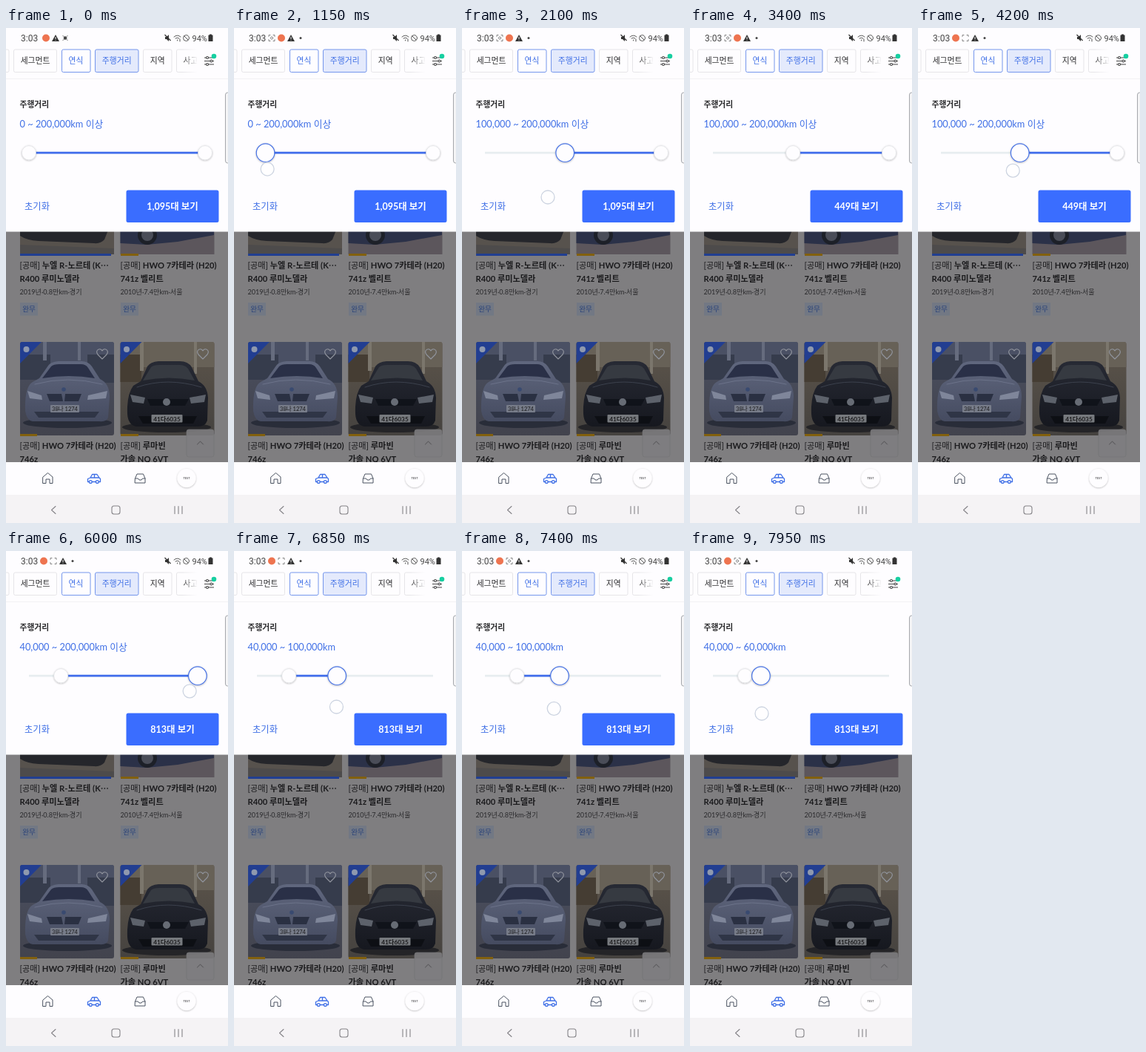
Write an HTML page that moves like this. It is 300 by 667 pixels and loops after 8000 ms.

```html
<!DOCTYPE html>
<html lang="ko">
<head>
<meta charset="utf-8">
<style>
html, body { margin: 0; width: 100%; height: 100%; overflow: hidden; background: #fff; }
svg { display: block; width: 300px; height: 667px; }
text { font-family: Lato, 'Noto Sans CJK KR', 'Noto Sans CJK', sans-serif; font-size: 10.8px; fill: #2b2b2d; white-space: pre; }
.status { font-family: Roboto, sans-serif; fill: #444; }
.bold { font-weight: 700; }
.blue { fill: #3f6fe6; }
.mid { text-anchor: middle; }
.line { fill: none; stroke-linecap: round; stroke-linejoin: round; }
.page text { fill: #1b1b1d; font-size: 11.2px; }
.page .info { font-size: 9.1px; fill: #2a2a2c; }
.page .tag { font-size: 9.6px; fill: #2a4379; }
</style>
</head>
<body>
<svg viewBox="0 0 300 667">
  <defs>
    <filter id="shadow" x="-30%" y="-30%" width="160%" height="170%">
      <feDropShadow dx="0" dy=".7" stdDeviation="1" flood-color="#222" flood-opacity=".3"/>
    </filter>
    <linearGradient id="fade"><stop stop-color="#fefdff" stop-opacity="0"/><stop offset="1" stop-color="#fefdff"/></linearGradient>
    <linearGradient id="coolRoad" x2="0" y2="1"><stop stop-color="#4b5061"/><stop offset="1" stop-color="#42434d"/></linearGradient>
    <linearGradient id="warmRoad" x2="0" y2="1"><stop stop-color="#5d554b"/><stop offset="1" stop-color="#45423f"/></linearGradient>
    <linearGradient id="paleBody" x2="0" y2="1"><stop stop-color="#60677e"/><stop offset="1" stop-color="#454b60"/></linearGradient>
    <linearGradient id="darkBody" x2="0" y2="1"><stop stop-color="#272a34"/><stop offset="1" stop-color="#16181f"/></linearGradient>
    <clipPath id="leftPhoto"><rect x="19" y="423" width="127" height="126" rx="3"/></clipPath>
    <clipPath id="rightPhoto"><rect x="154.500" y="423" width="127" height="126" rx="3"/></clipPath>
  </defs>

  <g class="page">
    <rect y="270" width="300" height="320" fill="#7f7e80"/>
    <!-- upper photos -->
    <rect x="19" y="270" width="127" height="35" fill="#57524d"/>
    <path d="M19 270H139L133 285Q128 291 119 290L44 287Q28 286 19 280Z" fill="#25262b"/>
    <path d="M19 292L146 297V305H19Z" fill="#4d4b4b"/>
    <rect x="154.500" y="270" width="127" height="35" fill="#5c565c"/>
    <path d="M154.500 270H281V279L232 288 190 292 154.500 290Z" fill="#2b3148"/>
    <circle cx="191" cy="279" r="13" fill="#1d2028"/><circle cx="191" cy="279" r="8" fill="#4a4d58"/>
    <path d="M19 304H142V307H19Z" fill="#213f91"/>
    <path d="M155 304H179V307H155Z" fill="#82600e"/>
    <text x="18.500" y="324">[공매] <tspan class="bold">누엘 R-노르테 (K⋯</tspan></text>
    <text x="18.500" y="342" class="bold">R400 루미노델라</text>
    <text x="18.500" y="358.500" class="info">2019년·0.8만km·경기</text>
    <text x="154.500" y="324">[공매] <tspan class="bold">HWO 7카테라 (H20)</tspan></text>
    <text x="154.500" y="342" class="bold">741z 벨리트</text>
    <text x="154.500" y="358.500" class="info">2010년·7.4만km·서울</text>
    <path d="M19 370H43V387.500H19ZM155 370H179V387.500H155Z" fill="#727884"/>
    <text x="31" y="382" class="tag mid">완무</text>
    <text x="167" y="382" class="tag mid">완무</text>

    <!-- pale car -->
    <g clip-path="url(#leftPhoto)">
      <rect x="19" y="423" width="127" height="126" fill="url(#coolRoad)"/>
      <path d="M19 423H146V462H19Z" fill="#4a5064"/>
      <path d="M19 440H60V474H19ZM110 440H146V478H110Z" fill="#363c4c"/>
      <path d="M50 423H55V448H50ZM97 423H101V448H97Z" fill="#666c7e"/>
      <ellipse cx="83" cy="532" rx="60" ry="7" fill="#292d39"/>
      <path d="M26 516Q25 483 36 477L45 472 57 455Q60 450 71 449H102Q111 449 116 456L127 473Q140 479 140 497L138 525Q136 531 126 530H36Q28 529 26 516Z" fill="url(#paleBody)"/>
      <path d="M49 472L61 456Q64 453 72 453H101Q108 453 111 458L120 472Q85 466 49 472Z" fill="#2a3047"/>
      <path d="M39 480Q83 468 130 480" class="line" stroke="#6c738a"/>
      <path d="M29 489L48 495 49 501 32 499ZM137 489L111 495 110 501 135 499Z" fill="#7f869a"/>
      <path d="M55 493H75L77 503H59ZM80 493H102L98 503H79Z" fill="#2a3042"/>
      <circle cx="78" cy="487" r="2.800" fill="#394a70"/>
      <path d="M38 517H126L120 525H44Z" fill="#2f3546"/>
      <rect x="60" y="508" width="39" height="10" rx="1" fill="#777c89"/>
      <text x="79.500" y="516" class="mid" style="font-size:7.500px">38나 1274</text>
    </g>

    <!-- dark car -->
    <g clip-path="url(#rightPhoto)">
      <rect x="154" y="423" width="128" height="126" fill="url(#warmRoad)"/>
      <path d="M154 423H282V457H154Z" fill="#676157"/>
      <path d="M154 440H183V477H154Z" fill="#453d33"/>
      <path d="M181 423H186V462H181ZM254 423H258V466H254Z" fill="#7b766c"/>
      <ellipse cx="217" cy="538" rx="60" ry="7" fill="#242427"/>
      <path d="M164 520Q163 494 172 482L182 476 191 456Q195 450 206 449H235Q246 449 251 457L260 476Q272 482 273 498L272 529Q269 538 257 537H176Q165 535 164 520Z" fill="url(#darkBody)"/>
      <path d="M185 475L196 457Q199 454 207 454H234Q242 454 246 459L255 475Q220 468 185 475Z" fill="#363a41"/>
      <path d="M177 484Q218 470 264 484" class="line" stroke="#3c414d"/>
      <path d="M168 494L188 498 186 506 171 504ZM270 494L248 498 250 506 268 504Z" fill="#5d626b"/>
      <path d="M191 500H247L242 509H195Z" fill="#10131a"/>
      <circle cx="217" cy="504" r="5" fill="#676c75"/>
      <path d="M179 523H258L253 533H185Z" fill="#0d0f14"/>
      <rect x="196.500" y="521" width="42" height="10.500" rx="1" fill="#777a7e"/>
      <text x="217.500" y="529.500" class="mid bold" style="font-size:8.300px">41다6035</text>
    </g>
    <path d="M19 452V426Q19 423 22 423H48ZM154.500 452V426Q154.500 423 157.500 423H183.500Z" fill="#223e91"/>
    <circle cx="27.500" cy="433" r="4" fill="#8f99ae"/><circle cx="163" cy="433" r="4" fill="#8f99ae"/>
    <g class="line" stroke="#92969f" stroke-width="1.100">
      <path id="heart" d="M130 446L124 440C120 434 127 430 130 435C133 430 140 434 136 440Z"/>
      <use href="#heart" x="136"/>
    </g>
    <path d="M19 547H42V550H19ZM155 547H179V550H155Z" fill="#82600e"/>
    <text x="18.500" y="566.500">[공매] <tspan class="bold">HWO 7카테라 (H20)</tspan></text>
    <text x="18.500" y="584.500" class="bold">746z</text>
    <text x="154.500" y="566.500">[공매] <tspan class="bold">루마빈</tspan></text>
    <text x="154.500" y="584.500" class="bold">가솔 NQ 6VT</text>
    <rect x="244" y="541" width="37" height="37" rx="3" fill="#7f7e80" fill-opacity=".88" stroke="#747476" stroke-width=".7"/>
    <path d="M258.500 561L262.500 557 266.500 561" class="line" stroke="#505052"/>
  </g>

  <rect width="300" height="274.500" fill="#fefdff"/>

  <!-- status bar -->
  <text x="20" y="18" class="status" style="font-size:12px">3:03</text>
  <circle id="orb" cy="13.500" r="5" fill="#ee7450"/>
  <g id="warning"><path d="M0 9L5 18H-5Z" fill="#333"/><path d="M0 12V15M0 16.300V17" stroke="#fff"/></g>
  <g id="scan" class="line" stroke="#777" stroke-width=".9">
    <path d="M-4 11.500V9.500H-2M2 9.500H4V11.500M4 15.500V17.500H2M-2 17.500H-4V15.500"/><circle id="scanCore" cy="13.500" r="1.600"/>
  </g>
  <circle id="dot" cx="90" cy="13.500" r="1.500" fill="#444"/>
  <g id="spark" class="line" stroke="#444"><circle cx="80" cy="13.500" r="1.800" fill="#444"/><path d="M77 10.500L78 11.500M83 10.500L82 11.500M77 16.500L78 15.500M83 16.500L82 15.500"/></g>
  <path d="M215 12H217L220 9V18L217 15H215Z" fill="#333"/><path d="M214.500 9L222.500 17" stroke="#333" stroke-width="1.200"/>
  <g class="line" stroke="#555"><path d="M227 12Q231.500 8 236 12M229 14Q231.500 12 234 14M231.500 16V17M235 15V18"/><circle cx="243.500" cy="13.500" r="4"/><path d="M241 11L246 16"/></g>
  <text x="251.500" y="17.500" class="status" style="font-size:11px">94%</text>
  <path d="M275 8.500H278V9.500H279.500V18H273.500V9.500H275Z" fill="#333"/>

  <!-- filter chips -->
  <g fill="#fefdff" stroke="#e6e5e8">
    <rect x="-12" y="29" width="16" height="30.500" rx="2"/>
    <rect x="10.500" y="29" width="58" height="30.500" rx="2"/>
    <rect x="75.500" y="29" width="38.500" height="30.500" rx="2" stroke="#7596ec"/>
    <rect x="120.500" y="29" width="58.500" height="30.500" rx="2" fill="#e4eafc" stroke="#7596ec"/>
    <rect x="185.500" y="29" width="38.500" height="30.500" rx="2"/>
    <rect x="230.500" y="29" width="48" height="30.500" rx="2"/>
  </g>
  <g class="mid">
    <text x="39.500" y="48">세그먼트</text><text x="94.500" y="48" class="blue">연식</text>
    <text x="149.700" y="48" class="blue">주행거리</text><text x="204.700" y="48">지역</text>
  </g>
  <text x="239.500" y="48">사고</text>
  <rect x="238" y="27" width="21" height="35" fill="url(#fade)"/><rect x="258.500" y="27" width="42" height="35" fill="#fefdff"/>
  <g fill="#fefdff" stroke="#444" stroke-width="1.100">
    <path d="M268 40H281M268 44.500H281M268 49H281"/>
    <circle cx="272" cy="40" r="1.500"/><circle cx="277.500" cy="44.500" r="1.500"/><circle cx="272" cy="49" r="1.500"/>
  </g>
  <circle cx="281" cy="38" r="3.300" fill="#17cfa1"/>
  <path d="M0 68.500H300" stroke="#f3f2f4"/>

  <!-- mileage panel -->
  <text x="18.500" y="107" class="bold">주행거리</text>
  <text id="range" x="18.500" y="134" class="blue" style="font-size:12.800px"></text>
  <rect x="296.500" y="87" width="8" height="95" rx="3" fill="#f4f4f6" stroke="#a5a7ac"/>
  <path d="M31 168.200H269" stroke="#e7edf0" stroke-width="2.800"/>
  <path id="fill" stroke="#406dec" stroke-width="2.800"/>
  <circle id="low" cy="168.200" fill="#fefdff" filter="url(#shadow)"/>
  <circle id="high" cy="168.200" fill="#fefdff" filter="url(#shadow)"/>
  <text x="25" y="244.500" class="blue" style="font-size:12.300px">초기화</text>
  <rect x="162.500" y="218.500" width="125" height="43.500" rx="2.500" fill="#3a6dff"/>
  <text id="button" x="225" y="244.700" class="mid bold" style="font-size:12.500px;fill:#fff"></text>
  <circle id="finger" r="9" fill="#fff" fill-opacity=".55" stroke="#cdd4e1" stroke-width="1.300"/>

  <!-- bottom bars -->
  <rect y="585" width="300" height="82" fill="#fefdff"/>
  <rect y="629" width="300" height="38" fill="#f5f3f5"/>
  <g class="line" stroke="#4b5361">
    <path d="M50 605L56.500 599.500 63 605V613.500H59V608H54V613.500H50Z"/>
    <path d="M174.500 607L177 601H185.500L188 607V613H174.500ZM174.500 607H178.500L180 609H183L184.500 607H188"/>
  </g>
  <g class="line" stroke="#3f6fe6" stroke-width="1.300">
    <path d="M112 611.500H110.500V607.500L114 606 116.500 601.500H123L126 606 127.500 607.500V611.500H125.500M116.500 611.500H121M114 606H126M119.500 601.500V606"/>
    <circle cx="114.300" cy="611.500" r="1.900"/><circle cx="123.300" cy="611.500" r="1.900"/>
  </g>
  <circle cx="244" cy="606.500" r="12.500" fill="#fefdff" filter="url(#shadow)"/>
  <text x="244" y="608" class="mid" style="font-size:4px">TEST</text>
  <g class="line" stroke="#858488" stroke-width="1.100">
    <path d="M67 644.500L61.500 649.500 67 654.500M228 644.500V654.500M233 644.500V654.500M238 644.500V654.500"/>
    <rect x="143" y="644" width="11" height="11" rx="3"/>
  </g>
</svg>
<script>
const LOOP = 8000, LEFT = 31, RIGHT = 269, LAST = 11, STEP = (RIGHT - LEFT) / LAST;
const $ = id => document.getElementById(id);
const set = (id, attrs) => { for (const k in attrs) $(id).setAttribute(k, attrs[k]); };
const show = (id, on) => set(id, { visibility: on ? 'visible' : 'hidden' });
const clamp01 = v => Math.max(0, Math.min(1, v));

// Finger points are [ms, x, y]; the handle stops following at "hold".
const drags = [
  { side: 'low', start: 650, hold: 2000, release: 2200, lift: 2330,
    path: [[650, 31, 176], [950, 34, 182], [1075, 42, 188], [1150, 45, 190], [1500, 88, 207], [1800, 133, 220], [2000, 138, 227], [2100, 116, 228], [2330, 116, 228]] },
  { side: 'low', start: 3950, hold: 4800, release: 4680, lift: 5000,
    path: [[3950, 139, 176], [4150, 135, 190], [4550, 82, 207], [4700, 78, 210]] },
  { side: 'high', start: 5650, hold: LOOP, release: LOOP, lift: LOOP + 80,
    path: [[5650, 269, 178], [5900, 265, 185], [6350, 190, 202], [6700, 139, 210], [7250, 137, 210], [7700, 99, 217], [7950, 97, 219]] }
];

function pointAt(path, t) {
  const i = path.findIndex(p => p[0] > t);
  if (i === 0) return path[0];
  if (i < 0) return path[path.length - 1];
  const a = path[i - 1], b = path[i], u = (t - a[0]) / (b[0] - a[0]);
  return a.map((v, k) => v + (b[k] - v) * u);
}

function stepAt(side, t) {
  let x = side === 'low' ? LEFT : RIGHT;
  for (const d of drags)
    if (d.side === side && t >= d.start) x = pointAt(d.path, Math.min(t, d.hold))[1];
  return Math.round((x - LEFT) / STEP);
}

// Averaging recent steps makes each snap glide for 150 ms.
function handleX(side, t) {
  let sum = 0;
  for (let i = 0; i < 15; i++) sum += stepAt(side, t - i * 10);
  return LEFT + STEP * sum / 15;
}

function drawHandle(side, t) {
  const x = handleX(side, t);
  const grow = Math.max(...drags.filter(d => d.side === side).map(d =>
    clamp01((t - d.start) / 120) * (1 - clamp01((t - d.release) / 120))));
  set(side, { cx: x, r: 9.6 + 2.7 * grow, stroke: grow > .2 ? '#4a74e4' : '#d5d7db', 'stroke-width': .5 + .7 * grow });
  return x;
}

function drawStatus(t) {
  const recording = t >= 150, swapped = t >= 3550;
  set('orb', { cx: !recording ? 54 : swapped ? 51 : 64 });
  set('warning', { transform: `translate(${recording ? 77 : 67} 0)` });
  set('scan', { transform: `translate(${swapped ? 64 : 51} 0)` });
  show('scan', recording);
  show('scanCore', recording && (!swapped || t > 7400));
  show('dot', recording);
  show('spark', !recording);
}

function buttonLabel(t) {
  if (t >= 2350 && t < 2950 || t >= 4800 && t < 5450) return '필터 적용중..';
  return (t < 2350 ? '1,095' : t < 4800 ? '449' : '813') + '대 보기';
}

function render(t) {
  drawStatus(t);
  const from = drawHandle('low', t), to = drawHandle('high', t);
  set('fill', { d: `M${from} 168.200H${to}` });
  const low = stepAt('low', t - 100), high = stepAt('high', t - 100);
  const km = step => (Math.min(step, LAST - 1) * 20000).toLocaleString('en-US');
  $('range').textContent = `${km(low)} ~ ${km(high)}km${high === LAST ? ' 이상' : ''}`;
  $('button').textContent = buttonLabel(t);
  const touch = drags.find(d => t >= d.start && t < d.lift);
  show('finger', touch);
  if (touch) {
    const [, cx, cy] = pointAt(touch.path, t);
    set('finger', { cx, cy, opacity: clamp01((touch.lift - t) / 80) });
  }
}

const begin = performance.now();
function frame() {
  render((performance.now() - begin) % LOOP);
  requestAnimationFrame(frame);
}
frame();
</script>
</body>
</html>
```
